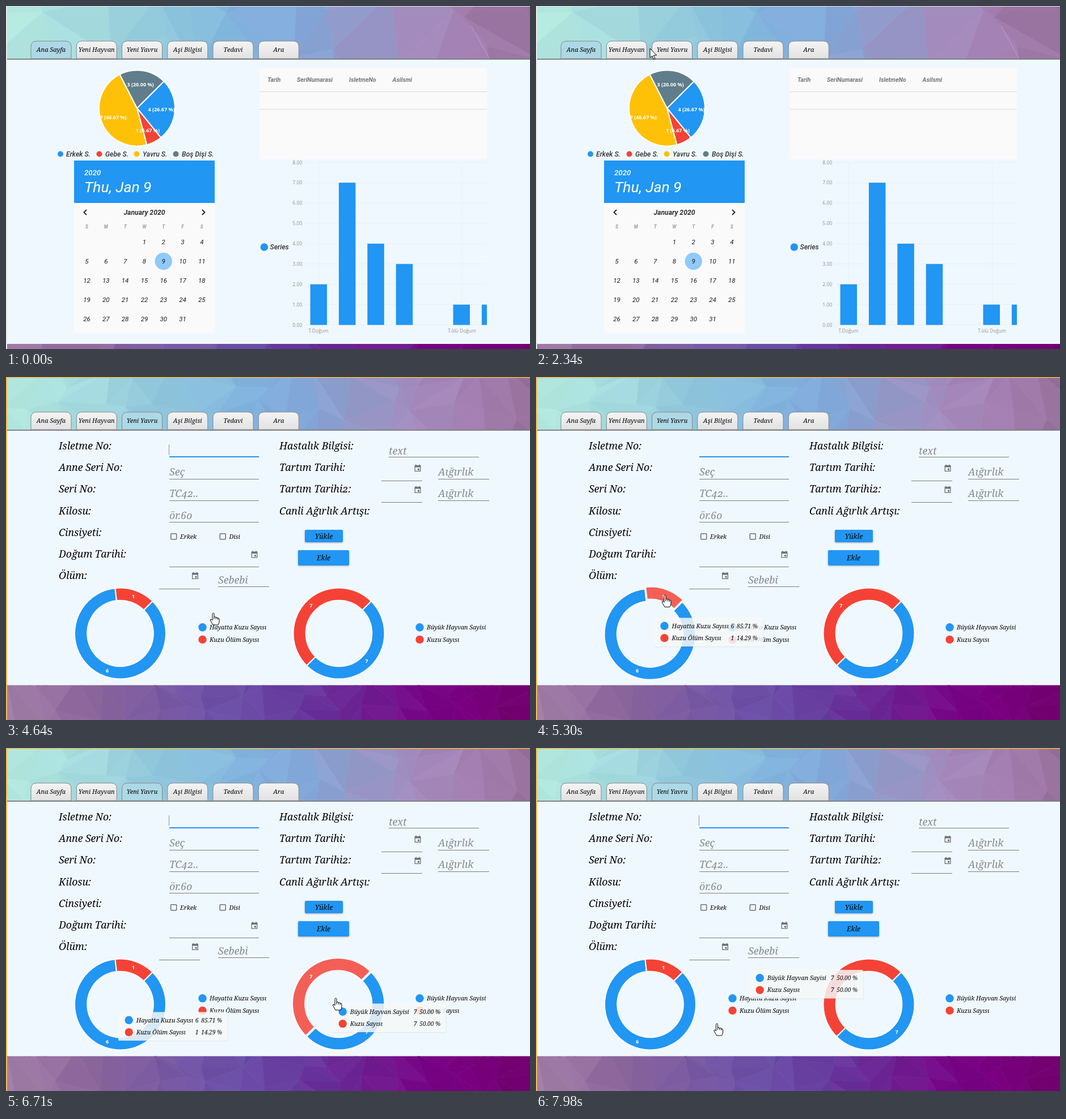
These frames come from a looping animation (924 by 606 pixels, 8000 ms). An HTML page:

```html
<!DOCTYPE html>
<html lang="tr">
<head>
<meta charset="utf-8">
<style>
  html, body { margin: 0; width: 100%; height: 100%; overflow: hidden; background: #f0f8ff; }
  svg { display: block; width: 924px; height: 606px; }
  text { white-space: pre; }
  .s { font-family: "Noto Serif", Georgia, serif; font-style: italic; }
  .n { font-feature-settings: "onum"; }
  .r { font-family: Roboto, sans-serif; font-style: italic; }
  .m { font-family: Roboto, sans-serif; font-style: italic; font-weight: 500; }
  .b { font-family: Roboto, sans-serif; font-style: italic; font-weight: 700; }
  .o { font-family: "Open Sans", sans-serif; }
  .w { font-family: "Open Sans", sans-serif; font-weight: 700; }
  .btn { filter: drop-shadow(0 1px 1.5px rgba(0, 0, 0, .3)); }
</style>
</head>
<body>
<svg id="stage" viewBox="0 0 924 606"></svg>
<script>
const LOOP = 8000, SWITCH = 3080;
const BLUE = '#2196f3', RED = '#f44336', YELLOW = '#ffc107', SLATE = '#607d8b';

// ---- markup helpers
const text = (x, y, str, cls, size, fill = '#111', anchor = 'start') =>
  `<text x="${x}" y="${y}" class="${cls}" font-size="${size}" fill="${fill}" text-anchor="${anchor}">${str}</text>`;
const rect = (x, y, w, h, fill, more = '') =>
  `<rect x="${x}" y="${y}" width="${w}" height="${h}" fill="${fill}" ${more}/>`;
const dot = (x, y, r, fill) => `<circle cx="${x}" cy="${y}" r="${r}" fill="${fill}"/>`;
const hline = (x1, x2, y, color = '#7b7d82') => rect(x1, y - .5, x2 - x1, 1, color);
const group = (id, body) => `<g id="${id}">${body}</g>`;

const polar = (cx, cy, r, deg) => {
  const a = deg * Math.PI / 180;
  return [cx + r * Math.sin(a), cy - r * Math.cos(a)];
};
function ring(cx, cy, a0, a1, R, r) {
  const big = a1 - a0 > 180 ? 1 : 0;
  const [p, q, u, v] = [[R, a0], [R, a1], [r, a1], [r, a0]].map(k => polar(cx, cy, ...k));
  return `M${p}A${R} ${R} 0 ${big} 1 ${q}L${u}A${r} ${r} 0 ${big} 0 ${v}Z`;
}

// ---- low-poly strips
const TOP = ['b4e9df', 'a9e0de', '9cd2de', '8cc3dd', '81b4dd', '82a8da', '939bca', 'a28abd', 'a580b2', '96709a'];
const FOOT = ['a280a8', '956f9f', '84619f', '7557a5', '694ca5', '673a9f', '6d2594', '780a89', '7a0080', '72006e'];
const mix = (a, b, k) => a + (b - a) * k;
function shade(stops, x, d) {
  const u = Math.max(0, Math.min(.999, x / 924)) * (stops.length - 1), i = Math.floor(u);
  const ch = n => [0, 2, 4].map(j => parseInt(stops[n].slice(j, j + 2), 16));
  const a = ch(i), b = ch(i + 1);
  return `rgb(${a.map((v, j) => Math.max(0, Math.round(mix(v, b[j], u - i) + d)))})`;
}
function facets(y, h, cell, stops, seed, amp) {
  const rnd = () => (seed = (seed * 16807) % 2147483647) / 2147483647;
  const cols = Math.ceil(924 / cell) + 2, rows = Math.ceil(h / cell) + 2, pts = [];
  for (let j = 0; j <= rows; j++)
    for (let i = 0; i <= cols; i++)
      pts.push([(i - 1 + (rnd() - .5) * .8) * cell, y + (j - 1 + (rnd() - .5) * .8) * cell]);
  let out = '';
  for (let j = 0; j < rows; j++)
    for (let i = 0; i < cols; i++) {
      const n = j * (cols + 1) + i, m = n + cols + 1;
      const tris = rnd() < .5 ? [[n, n + 1, m], [n + 1, m + 1, m]] : [[n, n + 1, m + 1], [n, m + 1, m]];
      for (const t of tris) {
        const p = t.map(k => pts[k]);
        const c = shade(stops, (p[0][0] + p[1][0] + p[2][0]) / 3, (rnd() - .5) * amp);
        out += `<polygon points="${p.join(' ')}" fill="${c}" stroke="${c}" stroke-width=".7"/>`;
      }
    }
  return `<svg x="0" y="${y}" width="924" height="${h}" viewBox="0 ${y} 924 ${h}" style="width:924px;height:${h}px">${out}</svg>`;
}

// ---- tabs
const TABS = ['Ana Sayfa', 'Yeni Hayvan', 'Yeni Yavru', 'Aşi Bilgisi', 'Tedavi', 'Ara'];
const tabs = TABS.map((name, i) => {
  const x = 44 + i * 80.25;
  return `<path id="tab${i}" d="M${x} 93V72Q${x} 62 ${x + 10} 62H${x + 61}Q${x + 71} 62 ${x + 71} 72V93Z" stroke="#85878c"/>`
    + text(x + 35.5, 81, name, 's', 11, '#000', 'middle');
}).join('');

// ---- home page
function pie() {
  const cx = 231, cy = 180.5;
  let a = 45;
  const parts = [[4, BLUE], [1, RED], [7, YELLOW], [3, SLATE]].map(([n, fill]) => {
    const from = a;
    a += n * 24;
    return `<path d="${ring(cx, cy, from, a, 67, 0)}" fill="${fill}" stroke="#fff" stroke-width="2"/>`;
  }).join('');
  const labels = [[274, 186, '4 (26.67 %)'], [189, 200, '7 (46.67 %)'], [250, 223, '1 (6.67 %)'], [237, 142, '3 (20.00 %)']]
    .map(([x, y, s]) => text(x, y, s, 'w', 9, '#fff', 'middle')).join('');
  const legend = [[96, 106, BLUE, 'Erkek S.'], [164.5, 175, RED, 'Gebe S.'], [230.5, 241, YELLOW, 'Yavru S.'], [299.5, 310, SLATE, 'Boş Dişi S.']]
    .map(([x, tx, c, s]) => dot(x, 261.5, 5, c) + text(tx, 266, s, 'm', 12.2, '#333')).join('');
  return parts + labels + legend;
}
function calendar() {
  let s = rect(120, 273, 248, 305, '#fafafa') + rect(120, 273, 248, 75, BLUE)
    + text(138, 299, '2020', 'm', 13.3, '#fff') + text(138, 328.5, 'Thu, Jan 9', 'r', 26.5, '#fff')
    + text(244, 368.5, 'January 2020', 'b', 12.2, '#333', 'middle')
    + '<path d="M142 360l-4.5 4.5 4.5 4.5M346 360l4.5 4.5-4.5 4.5" fill="none" stroke="#222" stroke-width="1.8"/>'
    + dot(277.7, 451, 15.2, '#90caf9');
  [...'SMTWTFS'].forEach((d, i) => s += text(142.5 + 33.8 * i, 392.5, d, 'b', 8.2, '#9a9a9a', 'middle'));
  for (let d = 1; d <= 31; d++) {
    const k = d + 2;
    s += text(142.5 + 33.8 * (k % 7), 421.3 + 33.95 * Math.floor(k / 7), d, 'r', 11.5, '#1c1c1c', 'middle');
  }
  return s;
}
function table() {
  return rect(447, 110, 401, 160.5, '#fafafa') + hline(447, 848, 151.5, '#d8d9db') + hline(447, 848, 182.5, '#d8d9db')
    + [[461, 'Tarih'], [513, 'SeriNumarasi'], [605, 'IsletmeNo'], [681.5, 'Asilsmi']]
      .map(([x, s]) => text(x, 134, s, 'b', 10.6, '#74767a')).join('');
}
function bars() {
  const y0 = 563.5, unit = 35.9;
  let s = '';
  for (let i = 0; i <= 8; i++)
    s += hline(527, 848, y0 - i * unit, '#e9f0f7') + text(522.5, y0 + 3.2 - i * unit, i + '.00', 'o', 8.7, '#8c8f94', 'end');
  for (const x of [551, 804]) s += rect(x, 276, 1, 287, '#e9f0f7');
  [2, 7, 4, 3, 0, 1, 1].forEach((v, i) => {
    const x = 536.5 + 50.4 * i;
    s += rect(x, y0 - v * unit, Math.min(29.5, 848 - x), v * unit, BLUE);
  });
  return s + text(551, 577, 'T.Doğum', 'o', 8.4, '#8c8f94', 'middle') + text(804, 577, 'T.ölü Doğum', 'o', 8.4, '#8c8f94', 'middle')
    + dot(455.3, 426, 6.8, BLUE) + text(465.5, 430.3, 'Series', 'm', 12.2, '#333');
}
const home = facets(1, 93, 84, TOP, 77, 7) + '<path d="M820 35L852 93" stroke="#c3a5cc" stroke-width=".8"/>'
  + facets(597, 9, 90, FOOT, 31, 8) + rect(0, 0, 924, 1, '#e2e2e2') + rect(0, 0, 2, 606, '#e6e6e6')
  + pie() + calendar() + table() + bars();

// ---- form page
const GREY = '#6d7076';
const dateIcon = (x, y) => `<path d="M${x - 5.5} ${y - 5}h11v11h-11zM${x - 4.2} ${y - 1.5}v6.2h8.4v-6.2z" fill="${GREY}" fill-rule="evenodd"/>`
  + rect(x - 3.8, y - 6.3, 1.6, 2, GREY) + rect(x + 2.2, y - 6.3, 1.6, 2, GREY) + rect(x, y + .7, 3, 3, GREY);
const hint = (x, y, s) => text(x, y, s, 's n', 17.8, '#868a8f');
const box = (x, s) => rect(x + .7, 276.7, 10, 10, 'none', `stroke="${GREY}" stroke-width="1.5" rx="1"`)
  + text(x + 17, 285.5, s, 's', 10.8, '#000');
const button = (x, y, w, h, s) => rect(x, y, w, h, BLUE, 'rx="2" class="btn"')
  + text(x + w / 2, y + h / 2 + 4.5, s, 's', 12.2, '#000', 'middle');
const labels = (x, list) => list.map((s, i) => text(x, 128 + i * 38.2, s, 's n', 17.7, '#000')).join('');

const fields = labels(93, ['Isletme No:', 'Anne Seri No:', 'Seri No:', 'Kilosu:', 'Cinsiyeti:', 'Doğum Tarihi:', 'Ölüm:'])
  + labels(482, ['Hastalık Bilgisi:', 'Tartım Tarihi:', 'Tartım Tarihi2:', 'Canli Ağırlık Artışı:'])
  + [141.5, 180.5, 218.5, 256.5, 335.5].map(y => hline(288, 446, y)).join('')
  + hint(288, 174, 'Seç') + hint(288, 212, 'TC42..') + hint(288, 250.7, 'ör.60')
  + box(290, 'Erkek') + box(376.5, 'Disi')
  + dateIcon(438, 313.5) + hline(270, 342, 374.5) + dateIcon(333.5, 351) + hint(374, 364.7, 'Sebebi') + hline(374, 464, 370.5)
  + hint(675, 136.5, 'text') + hline(675, 834, 141.5)
  + [0, 38].map(d => hline(662, 734, 183.5 + d) + dateIcon(726, 161 + d) + hint(762, 174 + d, 'Aığırlık') + hline(762, 852, 180.5 + d)).join('')
  + button(527, 270, 67, 22, 'Yükle') + button(515, 306, 90, 27, 'Ekle')
  + rect(288, 140, 158, 2, BLUE, 'id="focus"') + rect(287, 119, 1, 18.5, '#8d9095', 'id="caret"');

const DONUTS = [
  { cx: 201.5, lx: 346.5, rows: [[6, 'Hayatta Kuzu Sayısı', '85.71 %'], [1, 'Kuzu Ölüm Sayısı', '14.29 %']], w: 193, back: 1.4 },
  { cx: 587, lx: 729.5, rows: [[7, 'Büyük Hayvan Sayisi', '50.00 %'], [7, 'Kuzu Sayısı', '50.00 %']], w: 201, back: 0 }
];
const donut = (d, n) => d.rows.map((row, i) => {
  const c = i ? RED : BLUE, y = 442.3 + i * 21.6;
  return `<path id="slice${n}${i}" fill="${c}" stroke="#fff" stroke-width="2"/>`
    + `<text id="num${n}${i}" class="w" font-size="9" fill="#fff" text-anchor="middle">${row[0]}</text>`
    + dot(d.lx, y, 7.2, c) + text(d.lx + 12.5, y + 3.8, row[1], 's', 10.7, '#000');
}).join('');
const tip = (d, n) => group('tip' + n, rect(1, 1.5, d.w, 50.5, '#8796a5', 'opacity=".12" rx="2"')
  + rect(0, 0, d.w, 50.5, '#f9fafb', 'opacity=".83" rx="2"')
  + d.rows.map((row, i) => {
    const y = 14.3 + i * 21.3;
    return dot(18.7, y, 7.2, i ? RED : BLUE) + text(31.7, y + 3.8, row[1], 's', 10.7, '#000')
      + text(d.w - 51.5, y + 3.8, row[0], 's', 10.5, '#000', 'end') + text(d.w - 10, y + 3.8, row[2], 's', 10.1, '#000', 'end');
  }).join(''));

const form = facets(1, 93, 56, TOP, 4242, 8) + facets(544.5, 61.5, 52, FOOT, 99, 9)
  + fields + group('charts', DONUTS.map(donut).join('')) + DONUTS.map(tip).join('')
  + rect(0, 0, 924, 1.5, '#efb745') + rect(0, 0, 2, 606, '#f0bb50');

const arrow = '<path d="M0 0V16.5L3.8 13L6.5 19L9 18L6.4 12H11.7Z" fill="#fff" stroke="#000"/>';
const hand = '<path d="M-2 1.5Q-2 0-.5 0T1 1.5V7Q4 6 4.2 8Q7 7 7.2 9Q10 8.4 10 11V15Q10 18 8 21H-1L-5.5 13Q-6 10.5-4 11L-2 13Z" fill="#fff" stroke="#000"/><path d="M1 7V11M4.2 8V11M7.2 9V12" stroke="#000" fill="none"/>';

const stage = document.getElementById('stage');
stage.innerHTML = '<defs><linearGradient id="grey" x2="0" y2="1"><stop stop-color="#f4f4f4"/><stop offset="1" stop-color="#e2e2e2"/></linearGradient></defs>'
  + rect(0, 0, 924, 606, '#f0f8ff') + group('home', home) + group('form', form)
  + rect(2, 93, 922, 1.8, '#777a84') + tabs + group('arrow', arrow) + group('hand', hand);

// ---- motion tables: [ms, ...values]
const MOUSE = [[580, 806, 604], [850, 600, 400], [1100, 182, 256], [1350, 645, 466], [1700, 330, 250], [1950, 78, 76],
  [2190, 170, 78], [2340, 201, 75], [2660, 247, 75], [3400, 247, 75], [4100, 360, 400], [4640, 366, 417], [4960, 366, 417],
  [5250, 226, 384], [5450, 238, 392], [5720, 296, 445], [6000, 390, 455], [6400, 520, 425], [6710, 582, 442],
  [7050, 620, 495], [7400, 545, 490], [7980, 319.5, 487]];
const TIPS = [
  [[5130, 208, 425, 0], [5250, 208, 425, 1], [5720, 201, 441, 1], [6000, 198, 466.5, 1], [6730, 198, 466.5, 1], [6860, 198, 466.5, 0]],
  [[6330, 500, 420, 0], [6430, 510, 425, 1], [6600, 542, 442, 1], [6710, 575, 451.5, 1], [7000, 597, 498, 1], [7450, 420, 402, 1], [7800, 376, 392, 1], [8000, 376, 392, 1]]
];
const PUSH = [
  [[5130, 0], [5250, 1], [5900, 1], [6020, 0]],
  [[6330, 0], [6430, 1], [7620, 1], [7740, 0]]
];
function at(keys, t) {
  if (t <= keys[0][0]) return keys[0].slice(1);
  const i = keys.findIndex(k => k[0] > t);
  if (i < 0) return keys[keys.length - 1].slice(1);
  const a = keys[i - 1], b = keys[i];
  let k = (t - a[0]) / (b[0] - a[0]);
  k = k * k * (3 - 2 * k);
  return a.slice(1).map((v, j) => mix(v, b[j + 1], k));
}

const $ = id => document.getElementById(id);
const show = (id, on) => $(id).setAttribute('display', on ? 'inline' : 'none');
const move = (id, x, y) => $(id).setAttribute('transform', `translate(${x} ${y})`);

function drawDonut(d, n, t) {
  const grow = Math.max(0, Math.min(1, (t - 3750) / 500)), push = at(PUSH[n], t)[0];
  const total = d.rows[0][0] + d.rows[1][0];
  let a = 45;
  d.rows.forEach((row, i) => {
    const span = row[0] / total * 360, from = a * grow, to = (a + span) * grow, mid = (from + to) / 2;
    const [cx, cy] = polar(d.cx, 453, push * (i ? 2.2 : d.back), mid);
    const el = $(`slice${n}${i}`), num = $(`num${n}${i}`);
    el.setAttribute('d', ring(cx, cy, from, to, 80.5, 58.3));
    if (i) el.setAttribute('opacity', 1 - .16 * push);
    const [x, y] = polar(d.cx, 453, 69.5 * grow, mid);
    num.setAttribute('x', x);
    num.setAttribute('y', y + 3.2);
    a += span;
  });
}

function draw(t) {
  const onForm = t >= SWITCH, [mx, my] = at(MOUSE, t);
  show('home', !onForm);
  show('form', onForm);

  const hover = my > 62 && my < 93 && t > 1800 && t < 3600 ? Math.floor((mx - 44) / 80.25) : -1;
  const over = hover >= 0 && mx - 44 - hover * 80.25 <= 71;
  TABS.forEach((_, i) => {
    const on = i === (onForm ? 2 : 0) || (over && i === hover);
    $('tab' + i).setAttribute('fill', on ? '#add8e6' : 'url(#grey)');
  });
  const useHand = onForm || over;
  show('arrow', t >= 580 && !useHand);
  show('hand', useHand);
  move(useHand ? 'hand' : 'arrow', mx, my);
  if (!onForm) return;

  const k = Math.min(1, (t - 3360) / 150);
  const w = t < 3360 ? 0 : 158 * (1 - .46 * (1 - k) ** 2);
  $('focus').setAttribute('x', 367 - w / 2);
  $('focus').setAttribute('width', w);
  show('caret', t >= 3360 && Math.floor((t - 3360) / 530) % 2 === 0);

  show('charts', t >= 3750);
  DONUTS.forEach((d, n) => {
    drawDonut(d, n, t);
    const [x, y, o] = at(TIPS[n], t);
    move('tip' + n, x, y);
    $('tip' + n).setAttribute('opacity', o);
  });
}

const start = performance.now();
function tick() {
  draw((performance.now() - start) % LOOP);
  requestAnimationFrame(tick);
}
tick();
</script>
</body>
</html>
```
